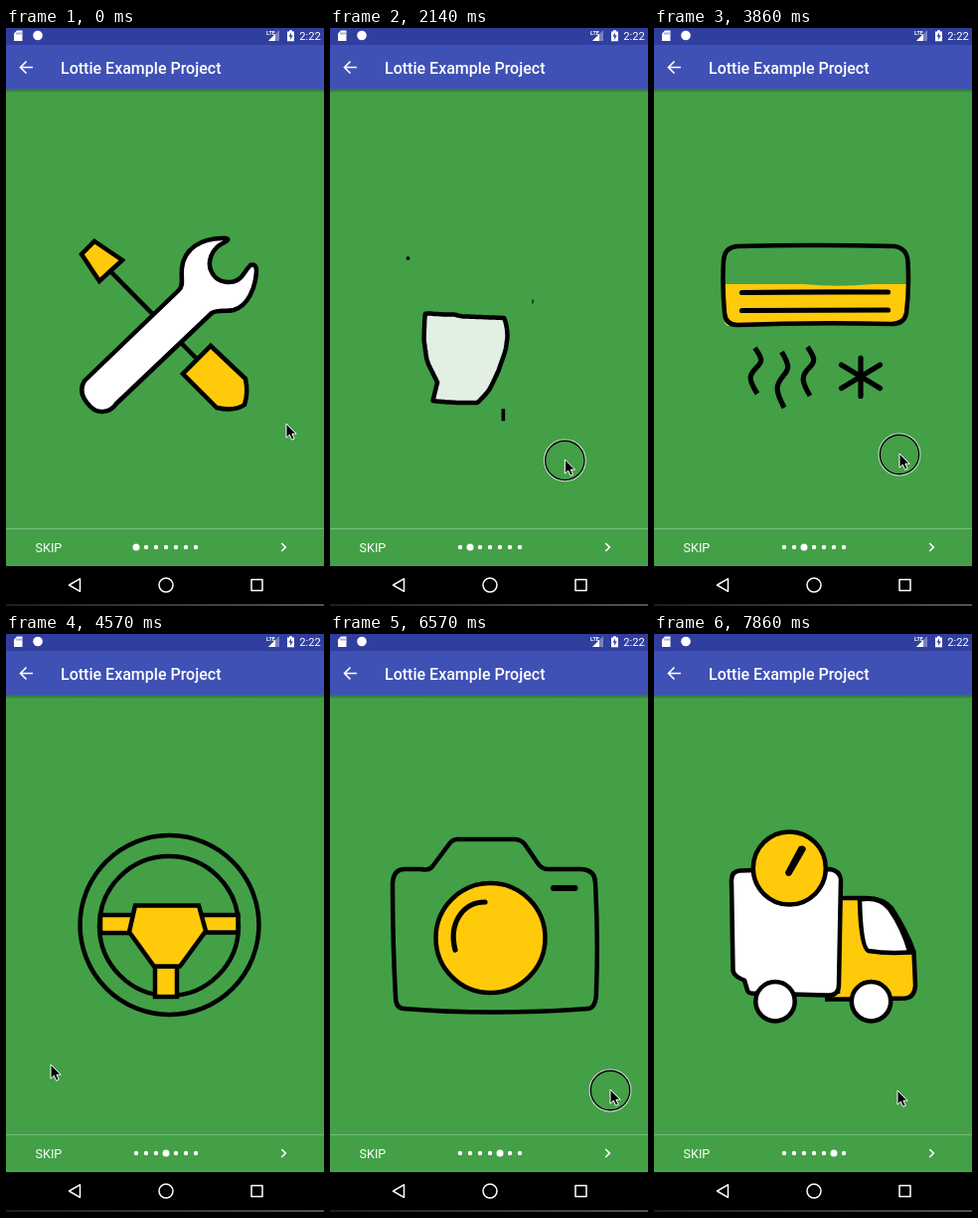
An HTML page for the animation above (8 s loop, 320x580 px).

```html
<!DOCTYPE html>
<html lang="en">
<head>
<meta charset="utf-8">
<title>App intro</title>
<style>
  html, body { margin: 0; width: 100%; height: 100%; overflow: hidden; background: #43a047; }
  svg { display: block; width: 100vw; height: 100vh; }
  text { font-family: Roboto, sans-serif; fill: #fff; }
  .ink { stroke: #000; stroke-width: 4.5; fill: none; }
  .ink .y { fill: #ffca0a; }
  .ink .w { fill: #fff; }
  .ink .k { fill: #000; stroke: none; }
  .ink .r { stroke-linecap: round; stroke-width: 5.2; }
  .line { fill: none; stroke: #fff; }
</style>
</head>
<body>
<svg viewBox="0 0 320 580">
  <defs>
    <linearGradient id="shade" x2="0" y2="1">
      <stop stop-color="#000" stop-opacity=".3"/>
      <stop offset="1" stop-color="#000" stop-opacity="0"/>
    </linearGradient>
    <linearGradient id="edge">
      <stop stop-color="#241c1a"/>
      <stop offset="1" stop-color="#5d504b"/>
    </linearGradient>
  </defs>
  <rect width="320" height="580" fill="#43a047"/>

  <g class="ink">
    <g id="back"></g>
    <path id="body" stroke-linejoin="round"/>
    <g id="front"></g>
  </g>

  <!-- status bar and toolbar -->
  <rect y="61.500" width="320" height="3.500" fill="url(#shade)"/>
  <rect width="320" height="61.500" fill="#3f51b5"/>
  <rect width="320" height="17" fill="#303f9f"/>
  <path d="M11 2.500h5.500v10.500h-8.500v-7.500z" fill="#fff"/>
  <path d="M11 4.500v2M13 4.500v2M15 4.500v2" stroke="#303f9f" stroke-width=".8"/>
  <circle cx="32" cy="7.500" r="4.800" fill="#fff"/>
  <path d="M264 13h11V2z" fill="#fff" opacity=".35"/>
  <path d="M264 13h7V6z" fill="#fff"/>
  <text x="262" y="7" font-size="5.500" font-weight="700">LTE</text>
  <path d="M283 3.500h2v-1.300h3v1.300h2v9.700h-7z" fill="#fff"/>
  <path d="M287 4.500l-2.500 4h1.700v3.500l2.500-4.500h-1.700z" fill="#303f9f"/>
  <text x="295.300" y="12" font-size="11.200">2:22</text>
  <path class="line" stroke-width="1.600" d="M27 39.500H15M20.500 33.500l-6 6 6 6"/>
  <text x="55" y="45.500" font-size="16" font-weight="500">Lottie Example Project</text>

  <!-- pager bar -->
  <path d="M0 502.500H320" stroke="#fff" stroke-opacity=".28"/>
  <text x="29.500" y="525.700" font-size="12.600">SKIP</text>
  <g id="dots" fill="#fff"></g>
  <path class="line" stroke-width="1.600" d="M277.300 517l4 4-4 4"/>

  <!-- navigation bar -->
  <rect y="540" width="320" height="40" fill="#000"/>
  <rect y="578" width="320" height="2" fill="url(#edge)"/>
  <g class="line" stroke-width="1.500" stroke-linejoin="round">
    <path d="M63.500 559l11-6.300v12.600z"/>
    <circle cx="161" cy="559" r="7"/>
    <rect x="247" y="553.500" width="11" height="11"/>
  </g>

  <g id="cursor">
    <g id="ring" fill="none">
      <circle cy="1" r="20.300" stroke="#fff" stroke-width="2.200" stroke-opacity=".75"/>
      <circle cy="1" r="19.700" stroke="#000" stroke-width="1.400"/>
    </g>
    <path d="M0 0V14.200L3.300 11.200 5.600 16.300 8.200 15.100 5.900 10.200H10.200Z" fill="#000" stroke="#fff"/>
  </g>
</svg>
<script>
const $ = id => document.getElementById(id);
const NS = 'http://www.w3.org/2000/svg';
const LOOP = 8000, FPS = 7, SAMPLES = 180;

function add(parent, tag, attrs) {
  const el = document.createElementNS(NS, tag);
  for (const k in attrs) el.setAttribute(k, attrs[k]);
  return parent.appendChild(el);
}

// Markup helpers for the loose parts: class, path data, optional stroke width
const path = (cls, d, sw) => `<path class="${cls}" d="${d}"${sw ? ` style="stroke-width:${sw}"` : ''}/>`;
const disc = (cls, x, y, r) => `<circle class="${cls}" cx="${x}" cy="${y}" r="${r}"/>`;
const wave = (x, y, h) => path('', `M${x} ${y}c8 ${h * .24} 8 ${h * .3} 1.500 ${h * .43}c-8 ${h * .17}-8 ${h * .26} 1 ${h * .57}`, 5.2);

// Each page: the outline that morphs, its fill opacity, parts behind and in front
const pages = [
  { // tools
    d: 'M79 354L174 263C179 258 176 252 177 241C179 222 196 210 221 211Q226 212 220 215C206 221 202 236 207 245C213 257 231 259 239 247Q243 241 246 238Q252 236 252 244C251 262 243 279 229 283C221 285 214 282 207 286L111 377C104 387 92 387 85 380C76 371 74 362 79 354Z',
    fill: 1,
    back: [
      path('', 'M104 243L191 331'),
      path('y', 'M89 214L117 233 94 254 76 227Z'),
      path('y', 'M206 319L241 352Q244 366 240 378Q230 385 212 381L178 347Z')
    ],
    front: []
  },
  {
    d: 'M100 298Q115 300 127 300L133 302 172 304Q173 314 169 327L154 359 135 390Q115 391 94 388L107 366 102 340 99 322Z',
    fill: 1,
    back: [],
    front: [
      disc('k', 78.5, 231, 2.4),
      path('k', 'M203.300 272h1.500v5h-1.500z'),
      path('k', 'M172 380.500h4.700v15.500h-4.700z')
    ]
  },
  { // air conditioner
    d: 'M84 219Q160 217 242 219Q255 221 255.500 235Q257 262 254 286Q252 297 239 297Q160 295 84 298Q72 298 71 286Q68.500 258 70 233Q71 220 84 219Z',
    fill: 0,
    back: [
      `<path d="M70 257H150Q185 260.500 220 257H255L254 286Q252 297 239 297Q160 296 74 299L71 296Z" fill="#ffca0a" stroke="none"/>`
    ],
    front: [
      path('r', 'M88.500 265.500Q160 264.500 235.500 265'),
      path('r', 'M88.500 283.500L235.500 283'),
      wave(101.5, 321, 46), wave(128.5, 325, 56), wave(154.5, 320, 49),
      path('r', 'M208 331V369.500M188.500 338L227.500 361.500M227.500 338L188.500 361.500')
    ]
  },
  { // steering wheel
    d: 'M74.500 292A90 90 0 0 1 254.500 292A90 90 0 0 1 74.500 292Z',
    fill: 0,
    back: [],
    front: [
      disc('', 164, 293, 70),
      path('y', 'M95 282H131V300H95Z'),
      path('y', 'M196 282H233.500V299.500H196Z'),
      path('y', 'M150 333H172V364H150Z'),
      path('y', 'M130 272.500H194L201 298 175 333.500H149L124 299Z')
    ]
  },
  { // camera
    d: 'M75 236H92Q100 238 104 232L119 212Q123 206 128 206H185Q192 206 196 211L209 230Q213 236 219 236H253Q267 237 267 250Q270 305 268 358Q268 376 259 376Q160 383 75 376Q66 376 66 364Q63 310 63 250Q64 236 75 236Z',
    fill: 0,
    back: [],
    front: [
      disc('y', 161.5, 305, 55),
      path('r', 'M126 317C119 290 134 269 156 269'),
      path('r', 'M225 255H246.500', 6)
    ]
  },
  { // truck
    d: 'M86 237.500Q77 238.500 78 249.500L79.500 338Q81 344 91 347.500L94 357.500Q95 361.500 103 360.500L174 362.500Q186 363.500 186 351.500L188 246.500Q187 237.500 177 236Q130 236 86 237.500Z',
    fill: 1,
    back: [
      path('y', 'M172 366.500H214L253 365.500Q262 364.500 263 353L261.500 319Q255 300 239 275Q231 265.500 214 265H185V361'),
      path('w', 'M207 266.500Q227 263 237 276Q250 294 257.500 319.500Q234 321 216 318Q208 316 207 266.500Z')
    ],
    front: [
      disc('w', 122, 368.7, 19.7), disc('w', 218.5, 368.7, 19.7),
      disc('y', 136.3, 235, 36.5),
      path('k', 'M132 239L146 213Q152 211 153 216L138 242Q133 245 132 239Z')
    ]
  }
];

const body = $('body');

// Evenly spaced points, starting at the top left
function sample(d) {
  body.setAttribute('d', d);
  const len = body.getTotalLength();
  const pts = Array.from({ length: SAMPLES }, (_, i) => body.getPointAtLength(len * i / SAMPLES));
  let start = 0;
  pts.forEach((q, i) => { if (q.x + q.y < pts[start].x + pts[start].y) start = i; });
  return pts.slice(start).concat(pts.slice(0, start));
}

const parts = [];
pages.forEach((page, i) => {
  page.pts = sample(page.d);
  for (const layer of ['back', 'front']) {
    for (const markup of page[layer]) {
      const g = add($(layer), 'g', {});
      g.innerHTML = markup;
      const b = g.getBBox();
      parts.push({ g, i, x: b.x + b.width / 2, y: b.y + b.height / 2 });
    }
  }
});

const dots = Array.from({ length: 7 }, (_, i) => add($('dots'), 'circle', { cx: 131 + 10 * i, cy: 521 }));

// Keyframes: time, then values
const scroll = [[430, 0], [1140, 1], [2000, 1], [2570, 2], [3860, 2], [4430, 3],
  [5430, 3], [6140, 4], [6570, 4], [7290, 5]];
const pointer = [[0, 282, 397], [430, 284, 410], [1140, 70, 435], [1290, 62, 437], [2000, 262, 432],
  [2710, 9, 441], [2860, 9, 441], [3710, 247, 427], [3860, 247, 427], [4430, 50, 432],
  [4710, 40, 432], [5430, 140, 416], [6000, 20, 436], [6430, 282, 457], [6570, 282, 457],
  [7140, 60, 452], [7290, 60, 454], [7860, 245, 458]];
const selected = [1290, 2860, 4290, 5860, 7000];
const presses = [[430, 1140], [2000, 2710], [3860, 4430], [5430, 6000], [6570, 7140]];

const ease = u => u * u * (3 - 2 * u);
const mix = (a, b, u) => a + (b - a) * u;

function at(keys, t) {
  const n = keys.findIndex(k => k[0] > t);
  if (n === 0) return keys[0].slice(1);
  if (n < 0) return keys[keys.length - 1].slice(1);
  const a = keys[n - 1], b = keys[n];
  const u = ease((t - a[0]) / (b[0] - a[0]));
  return a.slice(1).map((v, i) => mix(v, b[i + 1], u));
}

function drawBody(p) {
  const i = Math.floor(p), u = p - i;
  const a = pages[i], b = pages[Math.min(i + 1, pages.length - 1)];
  const d = u === 0 ? a.d : 'M' + a.pts.map((q, k) =>
    mix(q.x, b.pts[k].x, u).toFixed(1) + ' ' + mix(q.y, b.pts[k].y, u).toFixed(1)).join('L') + 'Z';
  body.setAttribute('d', d);
  body.setAttribute('fill', '#fff');
  body.setAttribute('fill-opacity', mix(a.fill, b.fill, u));
}

function draw(t) {
  const [p] = at(scroll, t);
  drawBody(p);
  for (const { g, i, x, y } of parts) {
    const s = ease(Math.max(0, 1 - 2 * Math.abs(p - i)));
    g.setAttribute('visibility', s > 0 ? 'visible' : 'hidden');
    g.setAttribute('transform', `translate(${x} ${y}) scale(${s}) translate(${-x} ${-y})`);
  }

  const page = selected.filter(s => t >= s).length;
  dots.forEach((dot, i) => dot.setAttribute('r', i === page ? 3.5 : 2.2));

  const [x, y] = at(pointer, t);
  $('cursor').setAttribute('transform', `translate(${x} ${y})`);
  const down = presses.some(([from, to]) => t >= from && t < to);
  $('ring').setAttribute('visibility', down ? 'visible' : 'hidden');
}

function tick() {
  const step = Math.floor((performance.now() % LOOP + 5) * FPS / 1000) % (LOOP * FPS / 1000);
  draw(Math.round(step * 100 / FPS) * 10);
  requestAnimationFrame(tick);
}
tick();
</script>
</body>
</html>
```
